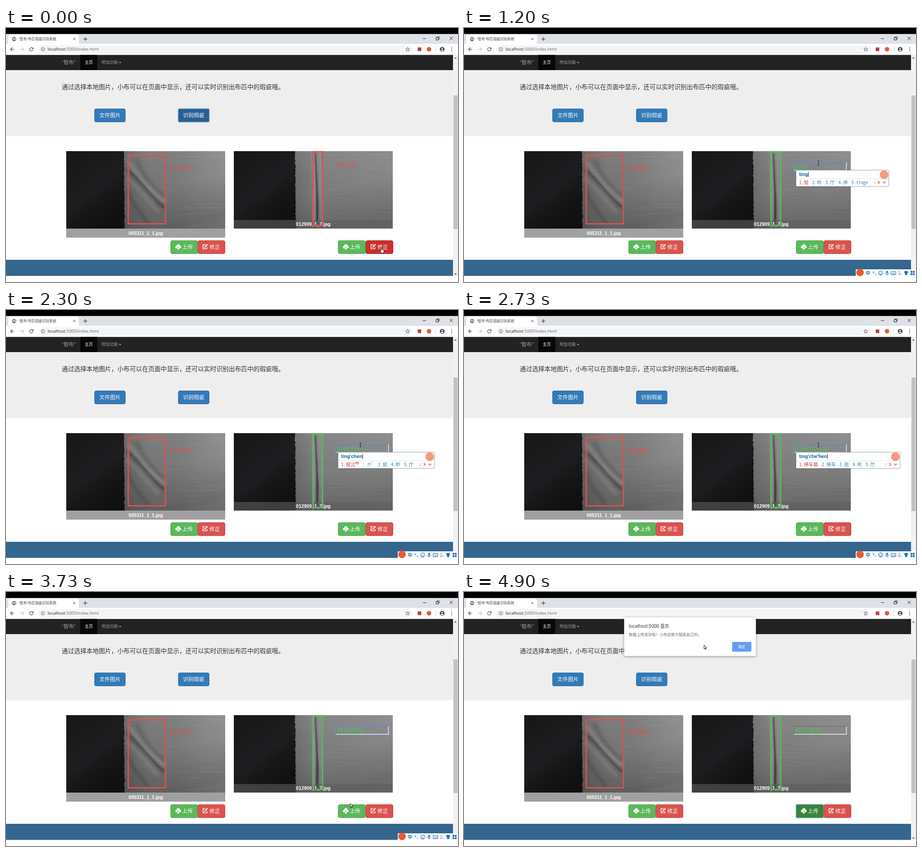
An HTML page with a canvas for the animation above (4.93 s loop, 998x561 px).

```html
<!DOCTYPE html>
<html lang="zh">
<head>
<meta charset="utf-8">
<style>
html, body { margin: 0; width: 100%; height: 100%; overflow: hidden; background: #fff; }
canvas { display: block; }
</style>
</head>
<body>
<canvas id="stage" width="998" height="561"></canvas>
<script>
const W = 998, H = 561, LOOP = 4930;
const stage = document.getElementById('stage').getContext('2d');
const page = document.createElement('canvas');
page.width = W; page.height = H;
let g = page.getContext('2d');

const ARIAL = '"Liberation Sans","Noto Sans CJK SC","Noto Sans CJK",sans-serif';
const UI = '"Open Sans","Noto Sans CJK SC","Noto Sans CJK",sans-serif';
const MONO = '"Noto Sans Mono CJK SC","Noto Sans CJK SC",monospace';
const RED = '#d9534f', GREEN = '#5cb85c', BLUE = '#337ab7', ORANGE = '#ea5a2b';

let seed = 7;
const rnd = () => (seed = seed * 16807 % 2147483647) / 2147483647;

// ---------- helpers ----------
function text(s, x, cy, size, color, font = ARIAL, weight = 400, align = 'left') {
  g.font = `${weight} ${size}px ${font}`;
  g.textAlign = align;
  g.fillStyle = color;
  g.fillText(s, x, cy + size * 0.37);
}
function rect(x, y, w, h, color) { g.fillStyle = color; g.fillRect(x, y, w, h); }
function round(x, y, w, h, r, fill, stroke, lw = 1) {
  g.beginPath(); g.roundRect(x, y, w, h, r);
  if (fill) { g.fillStyle = fill; g.fill(); }
  if (stroke) { g.strokeStyle = stroke; g.lineWidth = lw; g.stroke(); }
}
function disc(x, y, r, color) { g.beginPath(); g.arc(x, y, r, 0, 7); g.fillStyle = color; g.fill(); }
function ring(x, y, r, color, lw = 1) {
  g.beginPath(); g.arc(x, y, r, 0, 7); g.strokeStyle = color; g.lineWidth = lw; g.stroke();
}
function line(color, lw, ...p) {
  g.beginPath();
  for (let i = 0; i < p.length; i += 2) g.lineTo(p[i], p[i + 1]);
  g.strokeStyle = color; g.lineWidth = lw; g.stroke();
}
function poly(color, ...p) {
  g.beginPath();
  for (let i = 0; i < p.length; i += 2) g.lineTo(p[i], p[i + 1]);
  g.closePath(); g.fillStyle = color; g.fill();
}
function shade(x0, y0, x1, y1, ...colors) {
  const s = g.createLinearGradient(x0, y0, x1, y1);
  colors.forEach((c, i) => s.addColorStop(i / (colors.length - 1), c));
  return s;
}
function curve(color, lw, a, b, c, d) {
  g.beginPath(); g.moveTo(...a); g.bezierCurveTo(...b, ...c, ...d);
  g.strokeStyle = color; g.lineWidth = lw; g.stroke();
}

// ---------- buttons ----------
function button(x, w, y, fill, border, focus) {
  round(x + .5, y + .5, w - 1, 29, 3.5, fill, border);
  if (focus) round(x, y, w, 30, 3, null, '#8db8ee', 1.3);
}
function bigButton(x, label, focus) {
  button(x, 69, 178, focus ? '#286090' : BLUE, focus ? '#204d74' : '#2e6da4', focus);
  text(label, x + 34.5, 192.6, 11.7, '#fff', ARIAL, 400, 'center');
}
function upload(x, fill, focus) {
  button(x, 61, 469, fill, fill === GREEN ? '#4cae4c' : '#2f7330', focus);
  disc(x + 14, 484, 3, '#fff'); disc(x + 17.5, 481.2, 3.8, '#fff'); disc(x + 20.8, 483.8, 2.8, '#fff');
  rect(x + 13.5, 483, 7.5, 3.8, '#fff');
  poly(fill, x + 17.2, 482.6, x + 20.6, 486.4, x + 13.8, 486.4);
  poly('#fff', x + 17.2, 483.8, x + 20, 487, x + 18.5, 487, x + 18.5, 489.8, x + 15.9, 489.8, x + 15.9, 487, x + 14.4, 487);
  text('上传', x + 26, 484, 11.7, '#fff');
}
function amend(x, fill, focus) {
  button(x, 61, 469, fill, fill === RED ? '#d43f3a' : '#ac2925', focus);
  line('#fff', 1.5, x + 18, 478.6, x + 12, 478.6, x + 12, 487.6, x + 20.8, 487.6, x + 20.8, 484);
  line(fill, 4, x + 15.5, 484.5, x + 22.5, 477.5);
  line('#fff', 2.3, x + 16.2, 483.7, x + 22, 477.9);
  poly('#fff', x + 14.7, 485.3, x + 15.2, 482.6, x + 17.4, 484.8);
  text('修正', x + 26, 484, 11.7, '#fff');
}

// ---------- fabric pictures ----------
function cloth(x, edge, tones, folds) {
  g.save();
  g.beginPath(); g.rect(x, 272, 351, 171); g.clip();
  rect(x, 272, 351, 171, '#131313');
  rect(x, 272, edge - x, 171, shade(x, 272, edge, 443, 'rgba(40,40,44,.15)', 'rgba(40,40,46,.5)', 'rgba(0,0,0,.2)'));
  g.beginPath(); g.moveTo(x + 360, 270);
  for (let y = 270; y < 446; y += 1.5) g.lineTo(edge + rnd() * 2.4 + (y - 272) * .01, y);
  g.lineTo(x + 360, 446); g.closePath();
  g.fillStyle = shade(edge, 0, x + 351, 0, ...tones); g.fill();
  g.clip();
  rect(edge, 272, 260, 171, shade(edge + 60, 272, edge + 110, 443, 'rgba(255,255,255,.06)', 'rgba(0,0,0,.04)', 'rgba(0,0,0,.24)'));
  for (let i = 0; i < 240; i++) {
    const v = rnd() < .5 ? 0 : 255;
    rect(edge + rnd() * 220, 272 + rnd() * 171, 20 + rnd() * 60, .7, `rgba(${v},${v},${v},.045)`);
  }
  folds();
  g.filter = 'none';
  g.restore();
}
function leftFolds() {
  g.filter = 'blur(3px)';
  curve('rgba(190,190,190,.3)', 7, [270, 295], [292, 325], [315, 360], [352, 384]);
  curve('rgba(35,35,35,.45)', 5, [266, 312], [295, 336], [312, 366], [350, 398]);
  curve('rgba(180,180,180,.22)', 7, [266, 330], [290, 350], [305, 372], [338, 408]);
  curve('rgba(40,40,40,.25)', 6, [288, 290], [302, 322], [318, 345], [350, 372]);
  curve('rgba(40,40,40,.25)', 8, [268, 355], [275, 385], [295, 405], [315, 432]);
  g.filter = 'blur(1px)';
  curve('rgba(30,30,30,.3)', 2, [275, 318], [300, 340], [318, 368], [348, 396]);
}
function rightFolds() {
  g.filter = 'blur(2px)';
  line('rgba(200,200,200,.3)', 6, 679, 272, 681, 438);
  line('rgba(200,200,200,.2)', 5, 693, 272, 696, 438);
  g.filter = 'blur(1.2px)';
  poly('rgba(35,35,35,.65)', 681.5, 276, 684, 276, 690, 390, 689, 436, 684.5, 436, 685, 360);
}

// ---------- static page ----------
function chrome() {
  rect(0, 0, W, 13.5, '#000');
  rect(0, 13.5, W, 22, '#dee1e6');
  g.beginPath(); g.roundRect(5, 14, 156, 24, [5, 5, 0, 0]); g.fillStyle = '#fff'; g.fill();
  rect(0, 35, W, 24.5, '#fff');
  disc(18, 24.5, 4.6, '#5f6368');
  poly('#e8eaed', 14.5, 22.5, 18, 22.5, 19, 25, 16.5, 26.5, 15.5, 25);
  poly('#e8eaed', 19, 21, 21.3, 23, 21.5, 26, 19.8, 27.5);
  text('“智布”布匹瑕疵识别系统', 28, 24.6, 7.8, '#3c4043');
  line('#3c4043', 1, 148.5, 22, 153, 26.5); line('#3c4043', 1, 153, 22, 148.5, 26.5);
  line('#3c4043', 1.3, 171, 24.5, 179.5, 24.5); line('#3c4043', 1.3, 175.2, 20.2, 175.2, 28.8);
  line('#222', 1, 920.5, 23.5, 927.5, 23.5);
  g.strokeRect(949.5, 21.5, 5, 5); line('#222', 1, 951.5, 21, 951.5, 19.5, 956.5, 19.5, 956.5, 24.5, 955, 24.5);
  line('#222', 1, 979.5, 19.5, 986.5, 26.5); line('#222', 1, 986.5, 19.5, 979.5, 26.5);

  round(72, 38, 826, 18, 9, '#f4f5f6');
  const arrow = (x, d, c) => {
    line(c, 1.2, x - 4, 47, x + 4, 47);
    line(c, 1.2, x, 43, x + d * 4, 47, x, 51);
  };
  arrow(14, -1, '#4a4d51'); arrow(35, 1, '#bfc2c5');
  g.beginPath(); g.arc(56, 47, 3.8, .4, 5.6); g.strokeStyle = '#4a4d51'; g.lineWidth = 1.2; g.stroke();
  poly('#4a4d51', 60.5, 42.5, 60.5, 46.5, 56.5, 46.5);
  ring(81.5, 47, 3.8, '#5f6368'); rect(81, 46.5, 1, 2.8, '#5f6368'); rect(81, 44.7, 1, 1, '#5f6368');
  text('localhost', 92, 46.8, 9.35, '#202124', UI);
  const w = g.measureText('localhost').width;
  text(':5000/index.html', 92 + w, 46.8, 9.35, '#5f6368', UI);
  g.beginPath();
  for (let i = 0; i < 10; i++) {
    const a = i * Math.PI / 5 - Math.PI / 2, r = i % 2 ? 2 : 4.6;
    g.lineTo(887 + r * Math.cos(a), 47.3 + r * Math.sin(a));
  }
  g.closePath(); g.strokeStyle = '#5f6368'; g.lineWidth = 1; g.stroke();
  round(909, 43, 8, 8, 0, '#b9404b');
  disc(934, 47, 5, '#e2583a');
  rect(948.5, 41, 1, 12, '#d5d8dc');
  disc(963, 47, 5.3, '#4a4d51'); disc(963, 45.3, 1.6, '#fff');
  g.beginPath(); g.ellipse(963, 49.7, 3, 1.4, 0, 0, 7); g.fillStyle = '#fff'; g.fill();
  for (const y of [43.5, 47, 50.5]) disc(984, y, 1, '#4a4d51');
}
function body() {
  rect(0, 59.5, 987, 33.5, '#222');
  rect(164, 59.5, 37.5, 33.5, '#080808');
  text('“智布”', 123, 76, 11.7, '#9d9d9d');
  text('主页', 173.7, 76, 9.1, '#fff');
  text('附加功能', 211, 76, 9.1, '#9d9d9d');
  poly('#9d9d9d', 249, 75, 255, 75, 252, 78);
  rect(0, 93, 987, 146, '#eee');
  text('通过选择本地图片，小布可以在页面中显示，还可以实时识别出布匹中的瑕疵哦。', 123, 129.7, 13.67, '#333', ARIAL, 300);
  bigButton(195, '文件图片', false);

  cloth(133, 259, ['#606060', '#777', '#7c7c7c', '#888', '#939393'], leftFolds);
  cloth(503, 637, ['#6c6c6c', '#808080', '#848484', '#8a8a8a', '#8e8e8e'], rightFolds);
  const veil = 'rgba(94,94,94,.59)';
  rect(133, 443, 351, 20, veil); rect(503, 424, 351, 19, veil);
  text('005311_1_1.jpg', 308.5, 452.8, 10.4, '#fff', ARIAL, 700, 'center');
  text('012909_1_7.jpg', 678.5, 433.6, 10.4, '#fff', ARIAL, 700, 'center');
  g.strokeStyle = RED; g.lineWidth = 3; g.strokeRect(270, 282.3, 82, 150.2);
  text('卷边皱印', 361.7, 309.7, 11.7, RED, ARIAL, 300);
  upload(363, GREEN); amend(423, RED);

  rect(0, 512, 987, 35.5, '#35668e');
  rect(987, 59.5, 11, 488, '#f1f1f1');
  rect(988, 149, 9, 295, '#c1c1c1');
  poly('#505050', 989.8, 67.5, 995.2, 67.5, 992.5, 64.5);
  poly('#505050', 989.8, 542.2, 995.2, 542.2, 992.5, 545.2);
}

// ---------- moving parts ----------
const path = [[0, 829, 485], [110, 829, 485], [430, 782, 298], [3380, 782, 298], [3780, 759, 474],
  [3960, 759, 474], [4400, 546, 114], [4700, 546, 114], [4790, 485, 113], [4890, 530, 117], [LOOP, 530, 117]];
function pointer(t) {
  const i = path.findIndex(p => p[0] > t);
  const [t0, x0, y0] = path[i - 1], [t1, x1, y1] = path[i];
  let k = (t - t0) / (t1 - t0);
  k = k * k * (3 - 2 * k);
  return [x0 + (x1 - x0) * k, y0 + (y1 - y0) * k];
}
function outline(x, y, p) {
  g.beginPath();
  for (let i = 0; i < p.length; i += 2) g.lineTo(x + p[i], y + p[i + 1]);
  g.closePath();
  g.lineJoin = 'round'; g.fillStyle = '#fff'; g.fill();
  g.strokeStyle = '#111'; g.lineWidth = 1; g.stroke();
  g.lineJoin = 'miter';
}
function cursor(x, y, hand, beam) {
  if (beam) {
    line('#222', 1, x + .5, y - 4, x + .5, y + 4);
    line('#222', 1, x - 1.5, y - 4.5, x + 2.5, y - 4.5);
    line('#222', 1, x - 1.5, y + 4.5, x + 2.5, y + 4.5);
  } else if (hand) {
    outline(x, y, [-1, 0, 1, 0, 1, 4, 5.5, 5.2, 5.5, 8.5, 4.2, 12, -.8, 12, -3, 7.5, -2.2, 6.5, -1, 7.8]);
  } else {
    outline(x, y, [0, 0, 0, 8.6, 2, 7, 3.3, 10, 4.6, 9.4, 3.3, 6.5, 5.8, 6.3]);
  }
}

// [time, pinyin, shown letters, candidates, popup width]
const typing = [
  [1000, 't', '他她图天听', 205],
  [1060, 'ti', '提题体替踢', 205],
  [1130, 'tin', '听挺停厅庭', 205],
  [1190, 'ting', ['挺', '听', '厅', '停', 'tinge'], 205],
  [2060, "ting'c", ['停车', '挺', '听', '厅', '停'], 213],
  [2130, "ting'ch", ['停车', '挺', '听', '厅', '停'], 213],
  [2200, "ting'che", ['停车', '挺', '听', '厅', '停'], 213],
  [2280, "ting'chen", ['挺沉', '', '挺', '听', '厅'], 213],
  [2560, "ting'che", ['停车', '挺', '听', '厅', '停'], 213],
  [2660, "ting'che'hen", ['停车痕', '停车', '挺', '听', '厅'], 230],
  [2760, "ting'che'hen'song", ['停车痕松', '停车很松', '停车痕', '停车', '听'], 320]
];
const COMMIT = 2960;

function cloud(x, y, color) {
  g.beginPath(); g.ellipse(x, y, 4, 2.2, 0, 0, 7);
  g.strokeStyle = color; g.lineWidth = 1; g.stroke();
  disc(x, y - 1, 1.3, color);
}
function chevron(x, y, dx, dy, color, lw) {
  if (dx) line(color, lw, x - dx, y - 3, x + dx, y, x - dx, y + 3);
  else line(color, lw, x - 3, y - dy, x, y + dy, x + 3, y - dy);
}
function popup([, pinyin, words, w]) {
  const x = Math.min(733, 997 - w);
  g.save();
  g.shadowColor = 'rgba(0,0,0,.25)'; g.shadowBlur = 3;
  rect(x, 314, w, 36, '#fff');
  g.restore();
  g.strokeStyle = '#b9c0c6'; g.lineWidth = 1; g.strokeRect(x + .5, 314.5, w - 1, 35);
  line('#e3e6e8', 1, x + 1, 332.5, x + w - 1, 332.5);
  text(pinyin, x + 7, 323, 10.6, '#0c5fa8', ARIAL, 700);
  rect(x + 7.5 + g.measureText(pinyin).width, 318, 1, 11, '#222');
  let cx = x + 7;
  [...words].forEach((s, i) => {
    const gone = s === '', c = i ? '#2a83b5' : '#c8383a';
    text(i + 1 + '.', cx, 341, 10.4, gone ? '#cfd8de' : c, MONO);
    text(s, cx + 10.4, 341, 10.4, c, MONO);
    const len = /[a-z]/.test(s) ? s.length * 5.2 : s.length * 10.4;
    if (gone) { cloud(cx + 15, 340.5, '#5ba3d0'); cloud(cx + 21, 338, '#d5e6f1'); cx += 34; }
    else if (s === '挺沉') { cloud(cx + 35.3, 338, '#c8383a'); cx += 47; }
    else cx += 18.5 + len;
  });
  const r = x + w;
  chevron(r - 31, 341, -1.5, 0, '#ccc', 1.2);
  chevron(r - 22, 341, 1.5, 0, '#d8412f', 1.6);
  chevron(r - 10, 341, 0, 1.5, '#e2602f', 1.6);
  disc(r - 10.5, 324, 9.5, 'rgba(240,115,75,.72)');
}
function imeBar() {
  const c = '#1b6fc4';
  rect(865, 533, 133, 16, '#fff');
  disc(874.5, 540, 8.3, ORANGE);
  text('中', 886.8, 541, 10.2, c, ARIAL, 700);
  ring(904, 539.5, 1.3, c); text(',', 907, 539.5, 11, c, ARIAL, 700);
  ring(920, 541, 4.6, c, 1.1);
  disc(918.3, 539.8, .8, c); disc(921.7, 539.8, .8, c);
  g.beginPath(); g.arc(920, 541.2, 2.4, .3, 2.84); g.stroke();
  round(932.4, 536, 3.4, 6, 1.7, c);
  g.beginPath(); g.arc(934, 540.5, 3.6, 0, Math.PI); g.stroke();
  line(c, 1.1, 934, 544, 934, 546.3);
  round(943, 537.5, 10.5, 7.5, 1, null, c, 1.1);
  for (const y of [539.5, 541.5]) for (let x = 945; x < 952; x += 2) rect(x, y, 1, 1, c);
  rect(946, 543.2, 5, .9, c);
  disc(961, 538.5, 2, '#b8bfc6'); round(958, 541.5, 6, 4, 2, '#b8bfc6'); disc(965, 544, 2, '#cfd5da');
  poly(c, 971.5, 538.5, 974.5, 536.5, 977.5, 536.5, 980.8, 538.5, 979.5, 541.3, 978.7, 540.8, 978.7, 545.5, 973.6, 545.5, 973.6, 540.8, 972.8, 541.3);
  for (const [x, y] of [[986, 536.5], [991, 536.5], [986, 541.7], [991, 541.7]]) rect(x, y, 4, 4, c);
}
function field(t, step) {
  const focus = t >= 540 && t < 3820;
  const dark = focus ? '#5b7fc4' : '#6d6d6d', pale = focus ? '#dfe8fb' : '#f2f2f2';
  if (focus) { g.strokeStyle = '#7f9fdc'; g.lineWidth = 1; g.strokeRect(727.8, 295.8, 117.4, 19.4); }
  line(dark, 1.3, 728.6, 315, 728.6, 296.6, 845, 296.6);
  line(pale, 1.5, 729, 314.3, 844.3, 314.3, 844.3, 297);
  if (t < 1000) text('停车痕松', 729.5, 305.8, 15.6, '#6e6e6e', ARIAL, 300);
  else if (step) {
    const s = step[1].replaceAll("'", '');
    text(s, 729.5, 305.8, 15.6, GREEN);
    rect(729.5, 312.5, g.measureText(s).width, .8, GREEN);
  } else text('停车痕松', 729.5, 305.8, 15.6, GREEN, ARIAL, 300);
  if (focus && t < 860) rect(730, 298, 1, 16, '#222');
}
function dialog(t) {
  const dy = t < 3870 ? -4 : t < 3960 ? -1 : 0;
  g.save();
  g.translate(0, dy);
  g.shadowColor = 'rgba(0,0,0,.45)'; g.shadowBlur = 5; g.shadowOffsetY = 1;
  round(353.5, 56, 291, 85.5, 2, '#fff');
  g.restore();
  text('localhost:5000 显示', 364, 75.8 + dy, 9.9, '#202124', UI);
  text('数据上传成功啦！小布会努力提高自己的。', 364, 94 + dy, 8.46, '#5f6368');
  round(592, 110.3 + dy, 42.5, 21.4, 2.5, '#659cf3');
  text('确定', 613.3, 121.3 + dy, 7.8, '#fff', ARIAL, 400, 'center');
}

function draw(t) {
  g.drawImage(page, 0, 0);
  const [x, y] = pointer(t);
  const inRow = y >= 469 && y <= 499;
  const overAmend = inRow && x >= 794 && x < 854, overUpload = inRow && x >= 733 && x < 794;
  const editing = t >= 90, sent = t >= 3800;
  const step = t < COMMIT ? typing.findLast(s => s[0] <= t) : null;

  bigButton(380, '识别瑕疵', t < 75);
  upload(733, sent ? '#398439' : overUpload ? '#449d44' : GREEN, sent);
  const amendFocus = t >= 75 && t < 540;
  amend(794, amendFocus || overAmend ? '#c9302c' : RED, amendFocus);
  g.strokeStyle = editing ? GREEN : RED; g.lineWidth = 3;
  g.strokeRect(678, 273.3, 21, 162.7);
  if (editing) field(t, step);
  else text('停车痕松', 728.2, 302.7, 11.7, RED, ARIAL, 300);
  if (step) popup(step);
  if (t >= 1000 && t < 3830) imeBar();
  if (t >= 3830) dialog(t);
  const beam = editing && x > 728 && x < 845 && y > 296 && y < 315;
  cursor(x, y, overAmend || overUpload, beam);
}

rect(0, 0, W, H, '#fff');
chrome();
body();
g = stage;
const start = performance.now();
function tick() {
  draw((performance.now() - start) % LOOP);
  requestAnimationFrame(tick);
}
tick();
</script>
</body>
</html>
```
